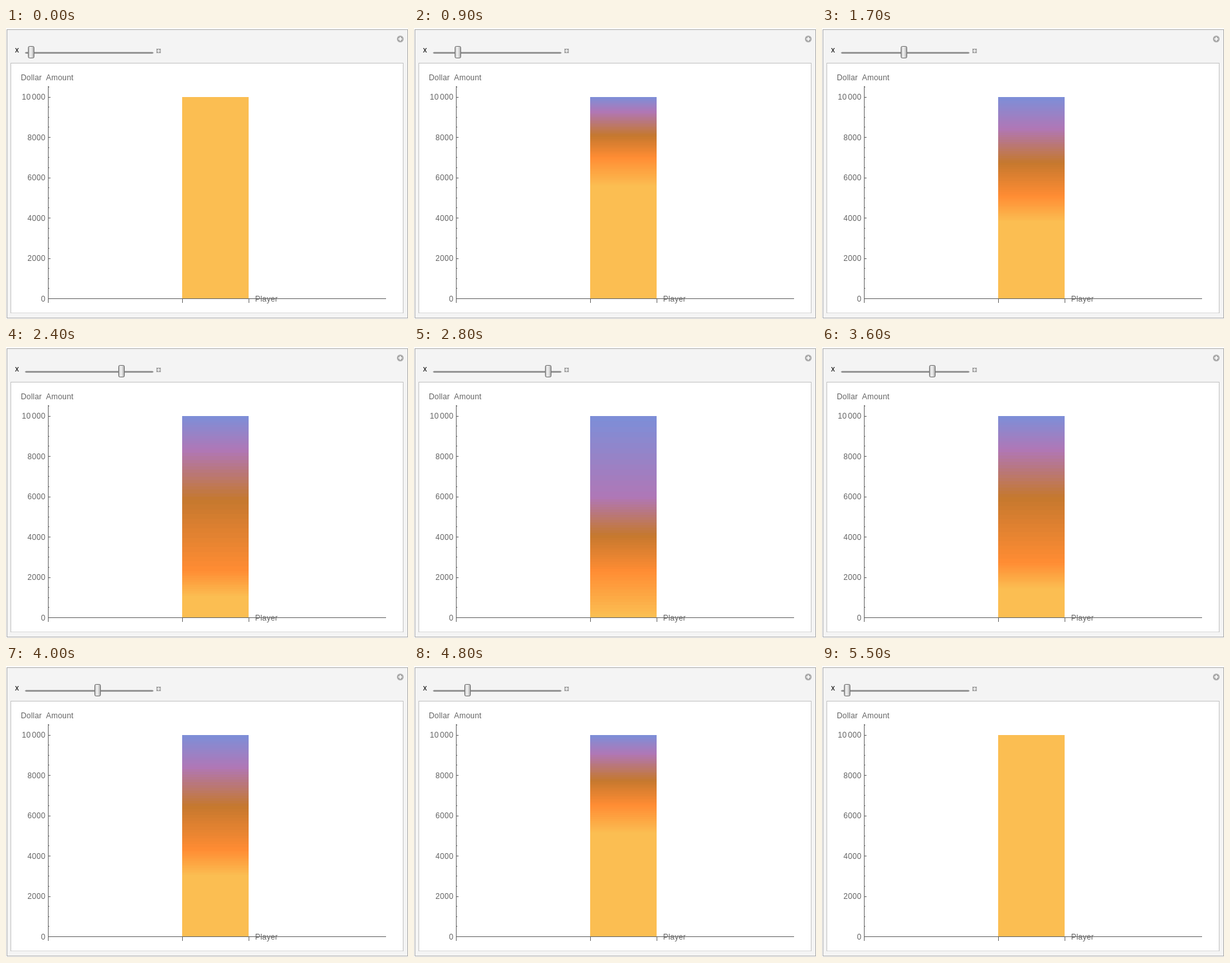
Recreate the animation shown at these times as an HTML page. Size 623 by 451 pixels, loop 6 s.

```html
<!DOCTYPE html>
<html lang="en">
<head>
<meta charset="utf-8">
<title>Dollar Amount</title>
<style>
  html, body { margin: 0; width: 100%; height: 100%; overflow: hidden; background: #fff; }
  svg { display: block; }
  text { font: 12px "Liberation Sans", Arial, sans-serif; fill: #666; letter-spacing: .2px; }
  #labels text { letter-spacing: .33px; }
  .end { text-anchor: end; }
  .axis { stroke: #666; fill: none; shape-rendering: crispEdges; }
</style>
</head>
<body>
<svg width="623" height="451" viewBox="0 0 623 451">
  <defs>
    <linearGradient id="knob">
      <stop offset="0" stop-color="#aaa"/>
      <stop offset=".35" stop-color="#f2f2f2"/>
      <stop offset=".6" stop-color="#e2e2e2"/>
      <stop offset="1" stop-color="#a0a0a0"/>
    </linearGradient>
  </defs>
  <rect x="1.5" y="2.5" width="621" height="447" fill="#f4f4f4" stroke="#acacac"/>
  <rect x="7.5" y="54.5" width="608" height="387" fill="#fff" stroke="#c3c3c3"/>
  <path d="M8 441.5h607" stroke="#dcdcdc"/>

  <circle cx="611" cy="17" r="5.2" fill="#aaa"/>
  <path d="M608 17h6M611 14v6" stroke="#fff" stroke-width="1.6"/>

  <text x="14" y="38" style="fill:#000">x</text>
  <path d="M29 38.5l2-1.5h196l2 1.5-2 1.5h-196z" fill="#a2a2a2"/>
  <path d="M30 38.5h198" stroke="#8c8c8c"/>
  <rect x="233" y="32" width="7" height="7" fill="#aaa"/>
  <path d="M234 35.5h5M236.5 33v5" stroke="#fff"/>
  <rect id="thumb" x="-4.5" y="28.5" width="9" height="18" rx="2" fill="url(#knob)" stroke="#707070"/>

  <rect x="273" y="107" width="103" height="312" fill="#fbbe52"/>
  <g id="bands" shape-rendering="crispEdges"></g>
  <path id="axes" class="axis"/>

  <text x="23" y="81">Dollar</text>
  <text x="62" y="81">Amount</text>
  <text x="386" y="424">Player</text>
  <g id="labels"></g>
</svg>
<script>
const NS = 'http://www.w3.org/2000/svg';
const $ = id => document.getElementById(id);
const add = (parent, tag, attrs, text = '') => {
  const el = document.createElementNS(NS, tag);
  for (const k in attrs) el.setAttribute(k, attrs[k]);
  el.textContent = text;
  return parent.appendChild(el);
};
const lerp = (a, b, f) => a + (b - a) * f;

// axes, ticks and labels
const TOP = 107;
const yOf = value => 419.6 - value * .03126;
const label = (x, y, text, cls = '') => add($('labels'), 'text', { x, y, class: cls }, text);
let axes = 'M65 419.5H589M65.5 90V426M273.5 419V426M376.5 419V426';
for (let v = 0; v <= 10500; v += 500) {
  const major = v % 2000 === 0;
  axes += `M66 ${Math.floor(yOf(v)) + .5}h${major ? 3 : 1}`;
  if (!major) continue;
  const y = Math.round(yOf(v) + 4);
  const wide = v >= 10000;
  if (wide) label(24.5, y, '10');
  label(61.3, y, wide ? '000' : v, 'end');
}
$('axes').setAttribute('d', axes);

// bands run from blue at the top down to yellow
const COLORS = [[126, 142, 215], [176, 119, 182], [197, 120, 46], [255, 140, 51], [251, 190, 82]];
const COUNT = 60;
const along = (u, pick) => {
  const i = Math.min(3, Math.floor(u * 4));
  return lerp(pick(i), pick(i + 1), u * 4 - i);
};
const bands = Array.from({ length: COUNT }, (_, i) => {
  const rgb = [0, 1, 2].map(c => Math.round(along(i / (COUNT - 1), k => COLORS[k][c])));
  return add($('bands'), 'rect', { x: 273, width: 103, fill: `rgb(${rgb})` });
});

// key poses: how far below the top each colour sits
const POSES = [
  { n: 0, depth: [0, 0, 0, 0, 0] },
  { n: 5, depth: [0, 22, 60, 94, 140] },
  { n: 13, depth: [0, 48, 102, 154, 195] },
  { n: 20, depth: [0, 52, 130, 240, 282] },
  { n: 22, depth: [0, 125, 185, 241, 312] }
];

function depthsAt(n) {
  const last = POSES[POSES.length - 1];
  const b = POSES.find(p => p.n > n) || last;
  const a = POSES[POSES.indexOf(b) - 1];
  const f = Math.min(1, (n - a.n) / (b.n - a.n));
  return a.depth.map((d, i) => lerp(d, b.depth[i], f));
}

// 25 steps up, a short hold, 25 steps down
const STEPS = 25;
function stepAt(t) {
  const since = at => Math.max(0, Math.min(STEPS, Math.floor((t - at) / 100) + 1));
  return since(500) - since(3100);
}

let shown = -1;
function draw(n) {
  const depths = depthsAt(n);
  const edge = i => Math.round(TOP + along(i / COUNT, k => depths[k]));
  bands.forEach((band, i) => {
    band.setAttribute('y', edge(i));
    band.setAttribute('height', edge(i + 1) - edge(i));
  });
  const x = 39 + Math.floor(Math.max(0, n - 1) * 7.37);
  $('thumb').setAttribute('transform', `translate(${x} 0)`);
}

const start = performance.now();
function tick(now) {
  const n = stepAt(Math.max(0, now - start) % 6000);
  if (n !== shown) draw(shown = n);
  requestAnimationFrame(tick);
}
tick(start);
</script>
</body>
</html>
```
